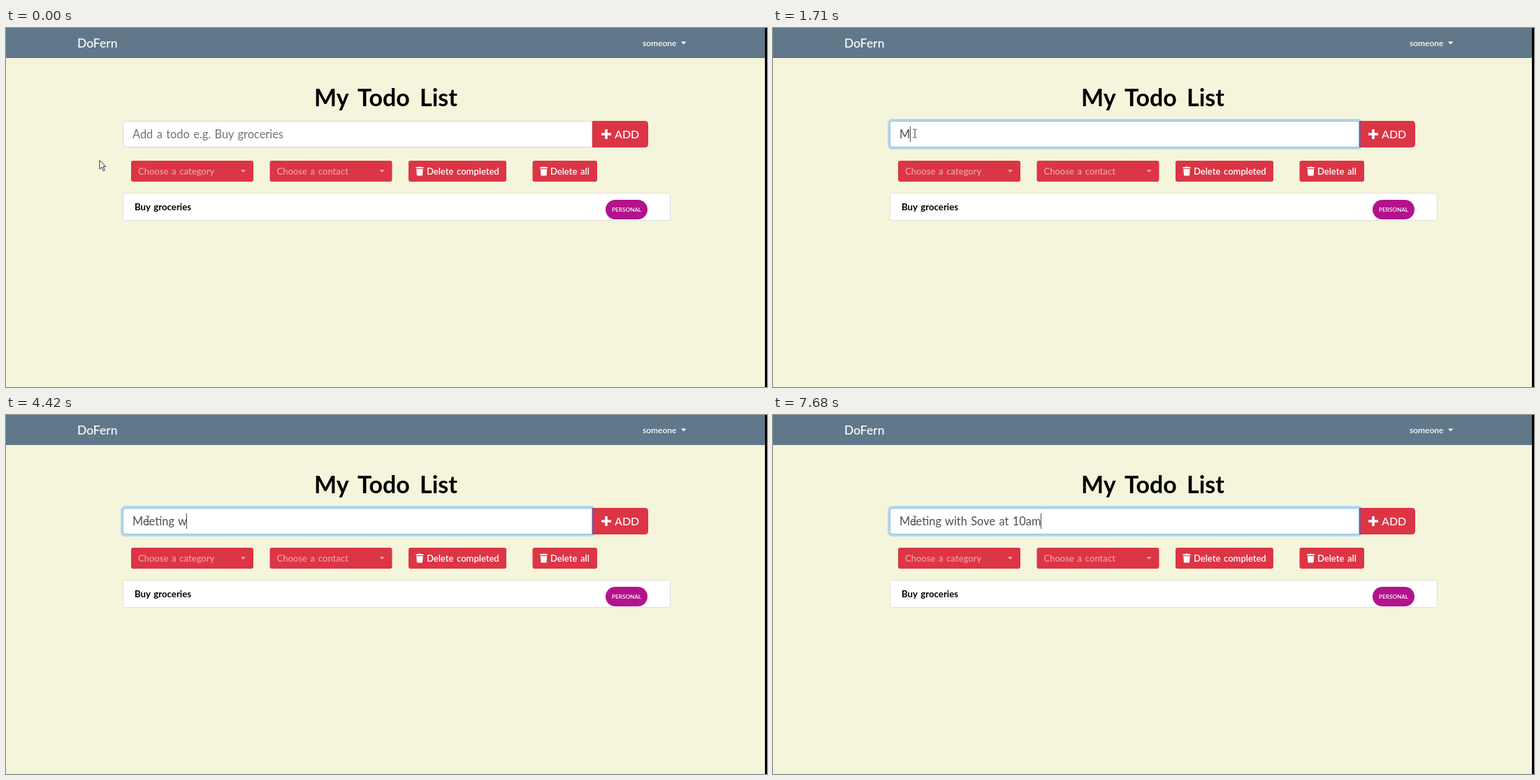
An HTML page for the animation above (8000 ms loop, 1089 by 514 pixels).

```html
<!DOCTYPE html>
<html lang="en">
<head>
<meta charset="utf-8">
<title>Todo list</title>
<style>
  html, body { margin: 0; width: 100%; height: 100%; overflow: hidden; background: #f5f5dc; }
  svg { display: block; width: 1089px; height: 514px; }
  text { font: 500 13px Lato, "Open Sans", sans-serif; word-spacing: 1.5px; white-space: pre; fill: #fff; }
  .brand { font-size: 17.5px; }
  .user { font-size: 12px; font-weight: 600; }
  .title { font-size: 34px; font-weight: 700; word-spacing: 6px; fill: #000; }
  .field { font-size: 16.4px; font-weight: 400; word-spacing: 1.2px; fill: #495057; }
  .hint { fill: #6c757d; }
  .add { font-size: 16px; }
  .strong { font-weight: 600; }
  .item { font-size: 13.2px; font-weight: 700; fill: #000; }
  .tag { font-size: 8.2px; font-weight: 600; }
  .red { fill: #dc3545; }
  .white { fill: #fff; }
  .faint { fill: #fff; opacity: .5; }
</style>
</head>
<body>
<svg viewBox="0 0 1089 514">
  <defs>
    <path id="down" d="M0 0h7.4l-3.7 4z"/>
    <path id="bin" d="M0 .8h3.2l.8-.8h3l.8.8H11v1.7H0zM.8 3.4h9.4l-.6 8.6q-.1 1-1.1 1h-6q-1 0-1.1-1z"/>
    <path id="frame" d="M838.5 133.5h-667q-4 0-4 4v29q0 4 4 4h667z"/>
  </defs>

  <rect width="1089" height="514" fill="#f5f5dc"/>
  <rect width="1089" height="43" fill="#60788a"/>
  <text class="brand" x="102" y="28">DoFern</text>
  <text class="user" x="911" y="26">someone</text>
  <use href="#down" x="966" y="19.5" class="white"/>

  <text class="title" x="441" y="111.5">My Todo List</text>

  <path class="red" d="M839 133h75q5 0 5 5v28q0 5-5 5h-75z"/>
  <path class="white" d="M857.2 145h3.6v5.2h5.2v3.6h-5.2v5.2h-3.6v-5.2H852v-3.6h5.2z"/>
  <text class="add" x="871" y="158">ADD</text>

  <use href="#frame" id="glow" fill="none" stroke="#007bff" stroke-opacity=".25" stroke-width="7" stroke-linejoin="round"/>
  <use href="#frame" id="box" fill="#fff" stroke="#ced4da"/>
  <text class="field hint" id="hint" x="181" y="158">Add a todo e.g. Buy groceries</text>
  <text class="field" id="typed" x="181" y="158"></text>
  <rect id="caret" y="141" width="1" height="22" fill="#495057"/>

  <g class="red">
    <rect x="179" y="190" width="175" height="30" rx="3"/>
    <rect x="377.5" y="190" width="175" height="30" rx="3"/>
    <rect x="576" y="190" width="140" height="30" rx="3"/>
    <rect x="753.5" y="190" width="92.5" height="30" rx="3"/>
  </g>
  <text class="faint strong" x="189" y="210">Choose a category</text>
  <use href="#down" x="335.8" y="203" class="faint"/>
  <text class="faint strong" x="387.5" y="210">Choose a contact</text>
  <use href="#down" x="534.4" y="203" class="faint"/>
  <use href="#bin" x="586.5" y="198.5" class="white"/>
  <text class="strong" x="602" y="210">Delete completed</text>
  <use href="#bin" x="764" y="198.5" class="white"/>
  <text class="strong" x="779" y="210">Delete all</text>

  <rect x="167.5" y="236.5" width="783" height="39" rx="3" fill="#fff" stroke="#dfdfdc"/>
  <text class="item" x="184" y="261">Buy groceries</text>
  <rect x="858" y="246" width="60" height="28" rx="14" fill="#b3128c"/>
  <text class="tag" x="867" y="263">PERSONAL</text>

  <path id="arrow" d="M.5.5v12.6l2.9-2.8 2.4 5.2 2-.9-2.4-5.1h3.9z" fill="#fff" stroke="#2b2b45"/>
  <path id="beam" d="M-2.5-6H-.7L0-5.3.7-6H2.5M0-5.3V5.3M-2.5 6H-.7L0 5.3.7 6H2.5" fill="none" stroke="#333"/>
  <circle id="click" cx="201.5" cy="151" r="9.5" fill="#f7ef32" opacity=".7"/>
  <rect x="1086" width="3" height="514"/>
</svg>
<script>
  const LOOP = 8000, PRESS = 1070;
  const message = "Meeting with Sove at 10am";
  const keyTimes = [
    1710, 2000, 2170, 2870, 2940, 3950, 4100, 4250, 4420, 4570, 4650, 4800, 4950,
    5350, 5500, 5730, 6140, 6430, 6680, 6750, 6930, 7150, 7310, 7610, 7680
  ];
  const caretOff = [[0, PRESS], [1620, 1710], [2690, 2870], [3490, 3950]];

  const el = id => document.getElementById(id);
  const [glow, box, hint, typed, caret, click, arrow, beam] =
    ["glow", "box", "hint", "typed", "caret", "click", "arrow", "beam"].map(el);
  const show = (node, on) => node.setAttribute("visibility", on ? "visible" : "hidden");
  const within = (t, [from, to]) => t >= from && t < to;

  function drawPointer(t) {
    // The pointer is sampled every 80 ms on its way to the field.
    const step = Math.max(0, Math.min(5, Math.floor((t - 680) / 80) + 1));
    const p = step / 5, k = p * p * (3 - 2 * p);
    const x = 133.5 + 69.5 * k, y = 189 - 38 * k;
    const overField = x > 167 && y < 171;
    show(arrow, !overField);
    show(beam, overField);
    (overField ? beam : arrow).setAttribute("transform", `translate(${x} ${y})`);
    show(click, within(t, [PRESS, 1160]));
  }

  function drawField(t) {
    const count = keyTimes.filter(k => k <= t).length;
    const text = message.slice(0, count);
    if (typed.textContent !== text) typed.textContent = text;
    show(hint, count === 0);
    show(caret, !caretOff.some(span => within(t, span)));
    const width = count ? typed.getComputedTextLength() : -0.5;
    caret.setAttribute("x", Math.round(181 + width - 0.5));

    const focus = t < 1160 ? 0 : t < 1240 ? 0.6 : 1;
    glow.setAttribute("opacity", focus);
    box.setAttribute("stroke", t < PRESS ? "#ced4da" : focus ? "#80bdff" : "#c4d2e0");
  }

  function draw(now) {
    const t = now % LOOP;
    drawPointer(t);
    drawField(t);
    requestAnimationFrame(draw);
  }
  draw(0);
</script>
</body>
</html>
```
